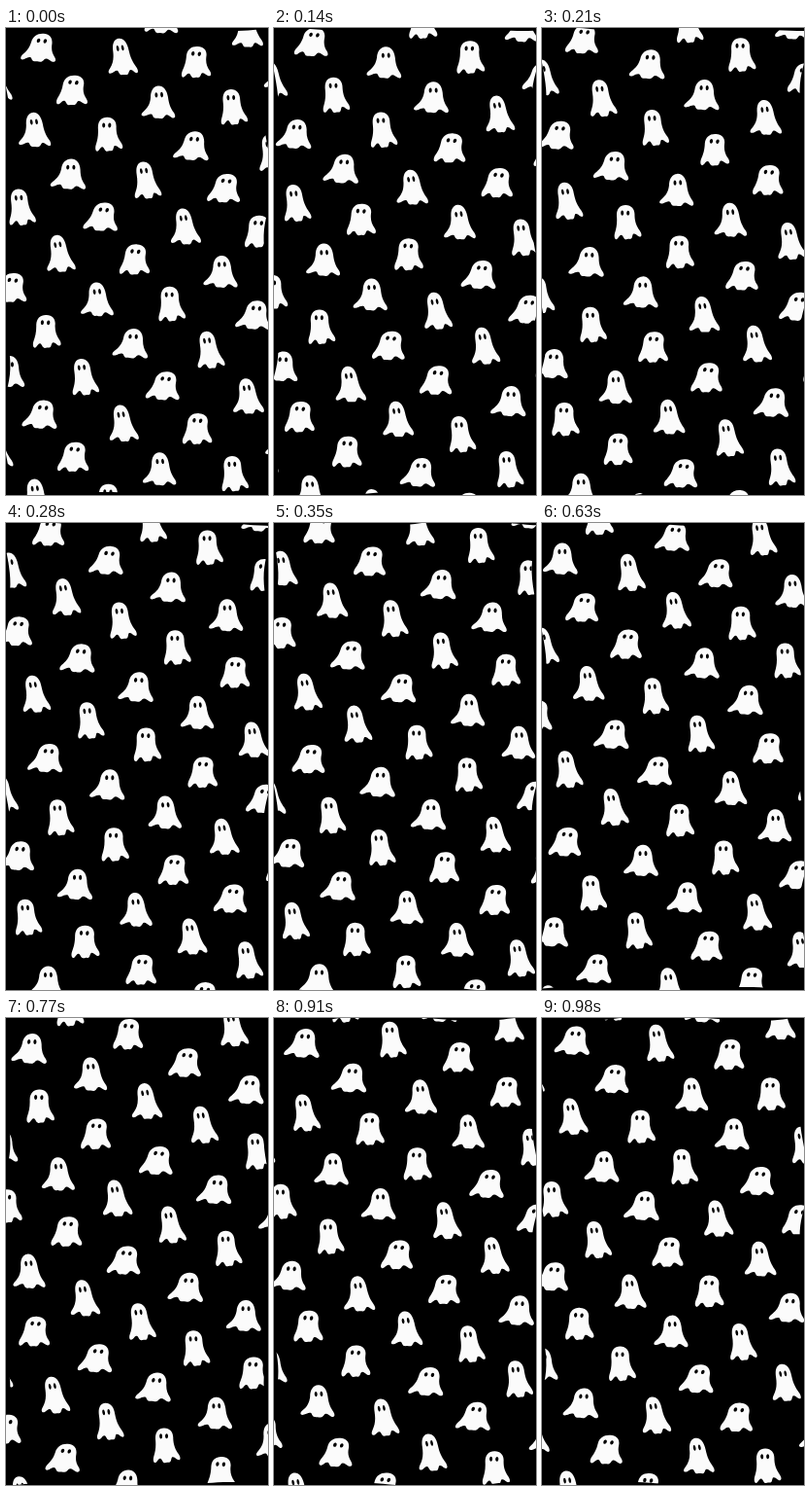
Recreate the animation shown at these times as an HTML page. Size 270 by 480 pixels, loop 1.05 s.

```html
<!DOCTYPE html>
<html lang="en">
<head>
<meta charset="utf-8">
<title>Drifting ghosts</title>
<style>
  html, body { margin: 0; width: 100%; height: 100%; overflow: hidden; background: #000; }
  svg { display: block; width: 100%; height: 100%; }
</style>
</head>
<body>
<svg viewBox="0 0 270 480">
  <defs><clipPath id="sheet"><path id="edge"/></clipPath></defs>
  <g clip-path="url(#sheet)">
    <path id="bodies" fill="#fbfbfb"/>
    <path id="eyes" fill="#000"/>
  </g>
</svg>
<script>
const W = 270, H = 480, STEP = 70, FRAMES = 15, TAU = Math.PI * 2;

// Ghost grid: neighbours across rows and along a row
const ORIGIN = [108.4, 111.5], ACROSS = [36.7, 45.7], ALONG = [-45.6, 37.1];

// Transverse wave that bends the whole sheet
const ANGLE = 35 * Math.PI / 180, LENGTH = 103, HEIGHT = 5.4;
const SIN = Math.sin(ANGLE), COS = Math.cos(ANGLE);
const CENTRE = [160, 173];

// Right half of the body, from the crown down to the middle of the hem
const HALF = [
  [0, -17], [5.6, -17], [9.2, -13], [9.4, -6],
  [9.7, 1], [11.4, 5], [14.6, 9.6],
  [17.2, 13.6], [15.6, 16.4], [12.4, 14.6],
  [10.4, 13.4], [9.2, 11.8], [7.2, 12],
  [5.4, 12.2], [5.4, 16.4], [2.6, 16.4],
  [1.6, 16.4], [0.8, 16.2], [0, 16.2]
];
const BODY = HALF.concat(HALF.slice(0, -1).reverse().map(([x, y]) => [-x, y]));

function oval(cx, cy, rx, ry) {
  const k = 0.5523;
  return [
    [0, -1], [k, -1], [1, -k], [1, 0], [1, k], [k, 1], [0, 1],
    [-k, 1], [-1, k], [-1, 0], [-1, -k], [-k, -1], [0, -1]
  ].map(([x, y]) => [cx + x * rx, cy + y * ry]);
}
const EYES = [oval(-3.3, -8.5, 1.5, 2.5), oval(2.7, -8.5, 1.5, 2.5)];

function warp(x, y, phase) {
  const n = (y - CENTRE[1]) * COS - (x - CENTRE[0]) * SIN;
  const d = HEIGHT * Math.sin(TAU * (n / LENGTH + phase));
  return (x + d * COS).toFixed(2) + " " + (y + d * SIN).toFixed(2);
}

function curve(points, cx, cy, phase) {
  const [first, ...rest] = points.map(([x, y]) => warp(cx + x, cy + y, phase));
  return "M" + first + "C" + rest.join(" ") + "Z";
}

function outline(phase) {
  const pts = [], gap = 6;
  for (let x = 0; x < W; x += gap) pts.push([x, 0]);
  for (let y = 0; y < H; y += gap) pts.push([W, y]);
  for (let x = W; x > 0; x -= gap) pts.push([x, H]);
  for (let y = H; y > 0; y -= gap) pts.push([0, y]);
  return "M" + pts.map(([x, y]) => warp(x, y, phase)).join("L") + "Z";
}

const put = (id, d) => document.getElementById(id).setAttribute("d", d);

function draw(phase) {
  let bodies = "", eyes = "";
  for (let i = -9; i < 15; i++) {
    // Neighbouring rows slide in opposite directions
    const slide = i % 2 ? phase : -phase;
    for (let j = -10; j < 13; j++) {
      const x = ORIGIN[0] + i * ACROSS[0] + (j + slide) * ALONG[0];
      const y = ORIGIN[1] + i * ACROSS[1] + (j + slide) * ALONG[1];
      if (x < -25 || x > W + 25 || y < -25 || y > H + 25) continue;
      bodies += curve(BODY, x, y, phase);
      for (const eye of EYES) eyes += curve(eye, x, y, phase);
    }
  }
  put("bodies", bodies);
  put("eyes", eyes);
  put("edge", outline(phase));
}

const start = performance.now();
let shown = -1;
function tick() {
  const frame = Math.floor((performance.now() - start) / STEP) % FRAMES;
  if (frame !== shown) draw((shown = frame) / FRAMES);
  requestAnimationFrame(tick);
}
tick();
</script>
</body>
</html>
```
